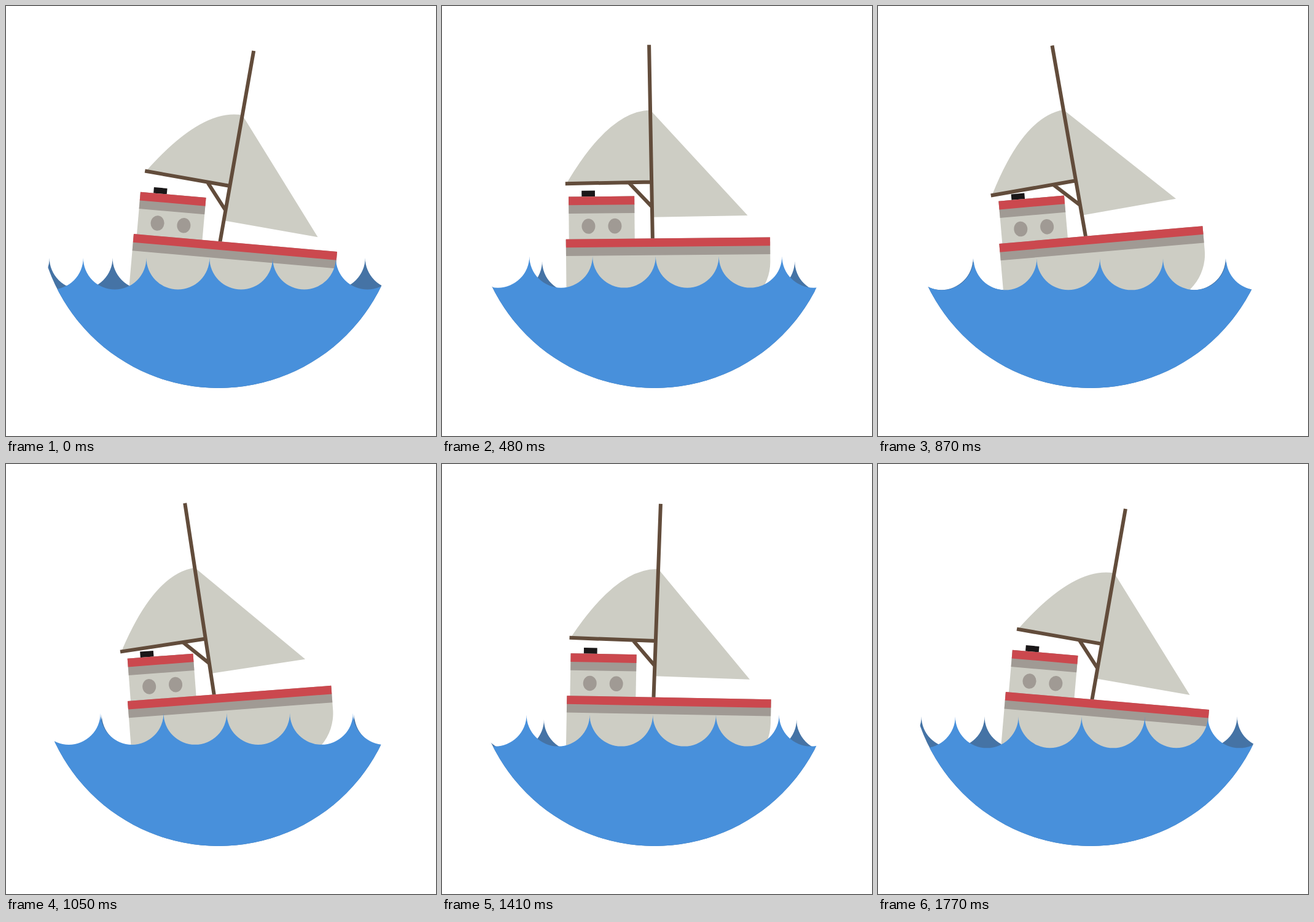
An HTML page that plays this animation: 700x700 px, repeating every 1800 ms.

```html
<!DOCTYPE html>
<html lang="en">
<head>
<meta charset="utf-8">
<title>Sailing boat</title>
<style>
  html, body { margin: 0; width: 100%; height: 100%; overflow: hidden; background: #fff; }
  svg { display: block; width: 100vw; height: 100vh; }
  .light { fill: #cdcdc4; }
  .grey { fill: #a09a94; }
  .red { fill: #cb484e; }
  .wood { fill: none; stroke: #624c3b; stroke-width: 6; }
</style>
</head>
<body>
<svg viewBox="0 0 700 700">
  <clipPath id="bowl"><circle cx="346" cy="327.5" r="294.5"/></clipPath>

  <g clip-path="url(#bowl)"><path id="back" fill="#4573a5"/></g>

  <g id="boat">
    <g id="rig">
      <path class="light" d="M206 285Q277 170 343.5 170L498.8 344.2H343.5V285Z"/>
      <path class="wood" d="M307 288L343 327M203 287H343.4M343.4 63.7V383"/>
    </g>
    <rect x="228.5" y="300.2" width="21.7" height="12" fill="#1a1718"/>
    <rect class="light" x="207.3" y="309.8" width="107" height="72"/>
    <rect class="grey" x="207.3" y="309.8" width="107" height="27.4"/>
    <rect class="red" x="207.3" y="309.8" width="107" height="13.7"/>
    <ellipse class="grey" cx="239.2" cy="358" rx="11" ry="12.3"/>
    <ellipse class="grey" cx="282.2" cy="358" rx="11" ry="12.3"/>
    <path class="light" d="M202.3 380H534.6V418A80 80 0 0 1 454.6 498H202.3Z"/>
    <rect class="grey" x="202.3" y="378.8" width="332.3" height="27.4"/>
    <rect class="red" x="202.3" y="378.8" width="332.3" height="13.7"/>
  </g>

  <g clip-path="url(#bowl)"><path id="front" fill="#4890db"/></g>
</svg>
<script>
  const LOOP = 1800, STEP = 30, SCALLOP = 102.8;
  const [back, boat, rig, front] =
    ['back', 'boat', 'rig', 'front'].map(id => document.getElementById(id));

  const arc = `a${SCALLOP / 2} ${SCALLOP / 2} 0 0 0 ${SCALLOP} 0`;
  const wave = `M0 0${arc.repeat(8)}V300H0Z`;
  back.setAttribute('d', wave);
  front.setAttribute('d', wave);

  const move = (el, x, y) => el.setAttribute('transform', `translate(${x} ${y})`);
  const turn = (el, deg, x, y) => el.setAttribute('transform', `rotate(${deg} ${x} ${y})`);

  function draw(now) {
    const t = Math.floor(now % LOOP / STEP) * STEP;
    const phase = t / LOOP * 2 * Math.PI;
    const sway = Math.cos(phase);
    // The waves bob twice per sway, each with its own peak in degrees
    const bob = peak => 4.6 * Math.cos(2 * phase - peak * Math.PI / 180);

    turn(boat, 5 * sway, 294, 440);
    turn(rig, 5 * sway, 343.4, 378.5);
    move(front, 243.5 - 3 * SCALLOP - 15 * sway, 408.2 + bob(294));
    move(back, 164 - 2 * SCALLOP + 9.5 * sway, 412.2 + bob(240));
  }

  const start = performance.now();
  function tick() {
    draw(performance.now() - start);
    requestAnimationFrame(tick);
  }
  tick();
</script>
</body>
</html>
```
